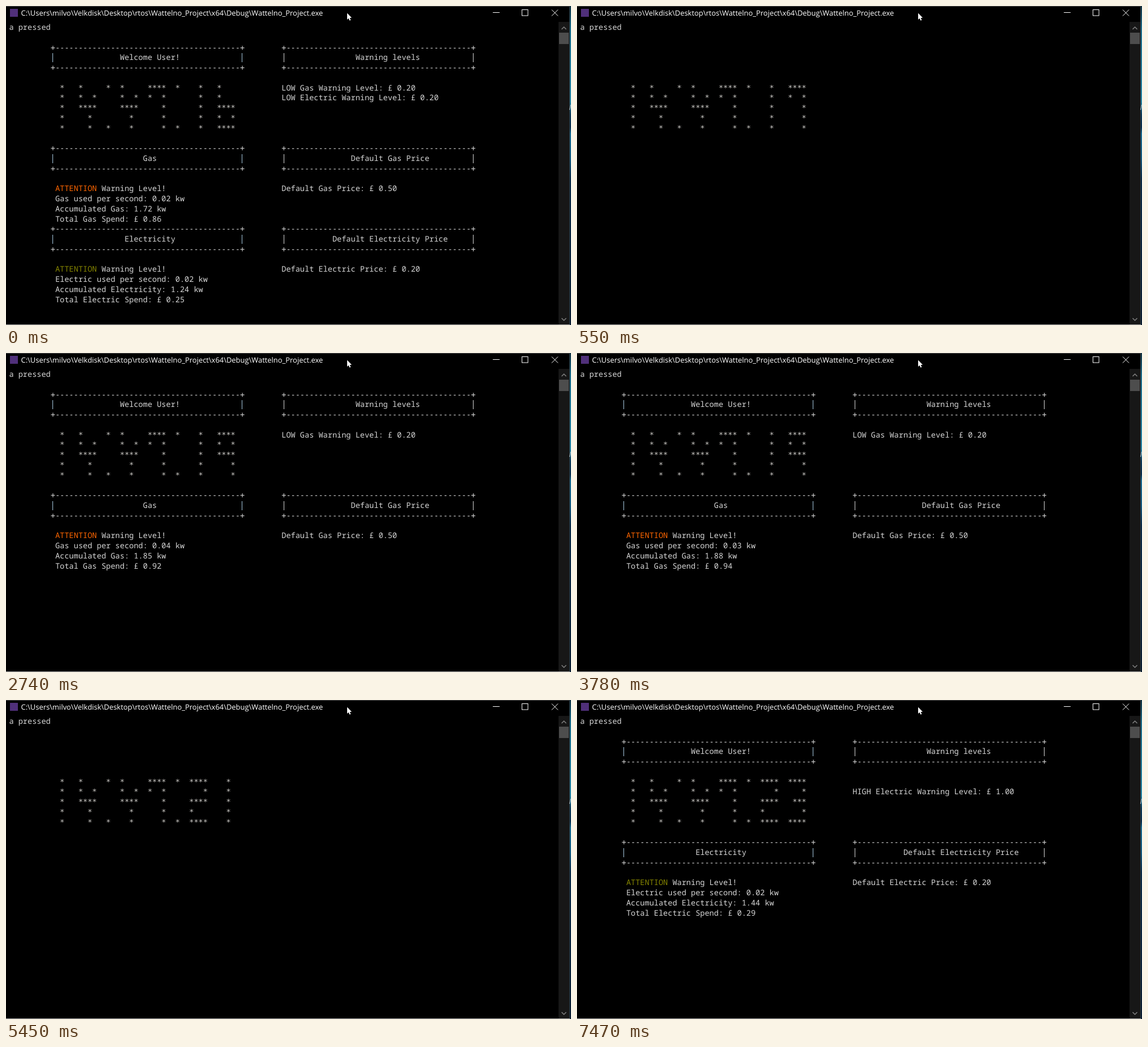
Recreate the animation shown at these times as an HTML page with a canvas. Size 997 by 562 pixels, loop 8000 ms.

```html
<!DOCTYPE html>
<html lang="en">
<head>
<meta charset="utf-8">
<title>Energy meter console</title>
<style>
  html, body { margin: 0; width: 100%; height: 100%; overflow: hidden; background: #000; }
  canvas { display: block; }
</style>
</head>
<body>
<canvas id="stage" width="997" height="562"></canvas>
<script>
const ctx = document.getElementById('stage').getContext('2d');
ctx.textRendering = 'geometricPrecision';

const LOOP = 8000;
const CELL = 8.15, ROW = 17.77, LEFT = 5.4, BASE = 42;
const MONO = '500 13.58px "Noto Sans Mono", monospace';
const LINES = '13.58px "DejaVu Sans Mono", monospace';
const UI = '12.93px "Open Sans", sans-serif';
const TEXT = '#d6d6d6', ORANGE = '#ff6600', OLIVE = '#858500', BLUISH = '#a9cbe2';
const PATH = 'C:\\Users\\milvo\\Velkdisk\\Desktop\\rtos\\Wattelno_Project\\x64\\Debug\\Wattelno_Project.exe';

// Five rows per digit, each four cells wide
const DIGITS = {
  0: '****|*  *|*  *|*  *|****',
  1: '  * |  * |  * |  * |  * ',
  2: '****|   *|****|*   |****',
  3: '****|   *| ***|   *|****',
  4: '*   |*  *|****|  * |  * ',
  6: '*   |*   |****|*  *|****',
  7: '****|*  *|   *|   *|   *',
  8: '****|*  *|****|*  *|****',
  9: '****|*  *|****|   *|   *',
  ':': '*| | | |*'
};

// Each entry changes only the fields it names
const TIMELINE = [
  { at: 0, page: 'both', sec: '16', gas: ['0.02', '1.72', '0.86'], elec: ['0.02', '1.24', '0.25'] },
  { at: 120, page: 'blank' },
  { at: 550, page: 'clock', sec: '17' },
  { at: 670, page: 'gas', gas: ['0.04', '1.76', '0.88'] },
  { at: 1600, sec: '18', gas: ['0.05', '1.81', '0.90'] },
  { at: 2620, sec: '19' },
  { at: 2740, gas: ['0.04', '1.85', '0.92'] },
  { at: 3780, gas: ['0.03', '1.88', '0.94'] },
  { at: 4530, sec: '20' },
  { at: 4930, gas: ['0.03', '1.90', '0.95'] },
  { at: 5180, page: 'blank' },
  { at: 5450, page: 'clock', sec: '21' },
  { at: 5950, page: 'elec', elec: ['0.02', '1.42', '0.28'] },
  { at: 6450, sec: '22' },
  { at: 6970, elec: ['0.02', '1.44', '0.29'] },
  { at: 7470, sec: '23' }
];

function stateAt(t) {
  return Object.assign({}, ...TIMELINE.filter(e => e.at <= t));
}

function rect(x, y, w, h, color) {
  ctx.fillStyle = color;
  ctx.fillRect(x, y, w, h);
}

function polyline(points, color, width = 1) {
  ctx.beginPath();
  points.forEach(([x, y]) => ctx.lineTo(x, y));
  ctx.strokeStyle = color;
  ctx.lineWidth = width;
  ctx.stroke();
}

// Console output on the character grid
function print(col, row, str, color = TEXT, font = MONO) {
  ctx.font = font;
  ctx.fillStyle = color;
  for (let i = 0; i < str.length; i++) {
    if (str[i] !== ' ') ctx.fillText(str[i], LEFT + (col + i) * CELL, BASE + row * ROW);
  }
}

function pipe(col, row, color) {
  const x = Math.floor(LEFT + (col + 0.5) * CELL);
  rect(x, Math.round(BASE + row * ROW) - 12, 1, 16, color);
}

function box(col, row, titleCol, title, pipeColor = TEXT) {
  const edge = '+' + '-'.repeat(40) + '+';
  print(col, row, edge, TEXT, LINES);
  print(col, row + 2, edge, TEXT, LINES);
  pipe(col, row + 1, pipeColor);
  pipe(col + 41, row + 1, pipeColor);
  print(titleCol, row + 1, title);
}

function clock(time) {
  let col = 9;
  for (const ch of time) {
    DIGITS[ch].split('|').forEach((line, r) => print(col, 6 + r, line, '#c8c6c2', LINES));
    col += ch === ':' ? 3 : 6;
  }
}

function section(row, titleCol, title, priceCol, price, unitPrice, color, lines) {
  box(9, row, titleCol, title, BLUISH);
  box(59, row, priceCol, price);
  print(10, row + 4, 'ATTENTION', color);
  print(20, row + 4, 'Warning Level!');
  lines.forEach((line, i) => print(10, row + 5 + i, line));
  print(59, row + 4, unitPrice);
}

function gasSection(row, [used, total, spend]) {
  section(row, 29, 'Gas', 74, 'Default Gas Price', 'Default Gas Price: £ 0.50', ORANGE, [
    `Gas used per second: ${used} kw`,
    `Accumulated Gas: ${total} kw`,
    `Total Gas Spend: £ ${spend}`
  ]);
}

function elecSection(row, [used, total, spend]) {
  section(row, 25, 'Electricity', 70, 'Default Electricity Price', 'Default Electric Price: £ 0.20', OLIVE, [
    `Electric used per second: ${used} kw`,
    `Accumulated Electricity: ${total} kw`,
    `Total Electric Spend: £ ${spend}`
  ]);
}

function drawWindow() {
  rect(0, 0, 997, 562, '#000');
  rect(0, 0, 995, 1, '#4a4a4a');

  rect(7, 5, 14, 14, '#50307a');
  ctx.font = UI;
  ctx.fillStyle = '#fff';
  ctx.fillText(PATH, 26.5, 17);

  polyline([[859, 11.5], [871, 11.5]], '#fff');
  ctx.strokeRect(910.5, 6.5, 10.5, 10.5);
  polyline([[963, 6.5], [974, 17.5]], '#fff');
  polyline([[974, 6.5], [963, 17.5]], '#fff');

  rect(975, 28, 19, 533, '#171717');
  rect(976, 47, 17, 20, '#4d4d4d');
  polyline([[980.5, 41], [984.5, 37], [988.5, 41]], '#808080', 1.5);
  polyline([[980.5, 550], [984.5, 554], [988.5, 550]], '#808080', 1.5);

  // Sliver of desktop beside the window
  const sky = ctx.createLinearGradient(0, 0, 0, 562);
  [[0, '#123242'], [0.07, '#1d6f8c'], [0.3, '#2a88a6'], [0.34, '#0e3a58'], [0.38, '#0a2c4a'],
   [0.4, '#1b6d92'], [0.48, '#175b80'], [0.54, '#0b2a46'], [1, '#0a1c30']]
    .forEach(([p, c]) => sky.addColorStop(p, c));
  rect(994, 0, 3, 562, sky);
  rect(994, 0, 1, 562, '#2b3a42');
  polyline([[994.5, 183], [996.5, 174]], '#c5d5da');
  rect(0, 561, 995, 1, '#a8a8a8');
}

function drawCursor() {
  ctx.beginPath();
  [[602, 12.5], [602, 24], [604.6, 21.7], [606.4, 25.7], [608.3, 24.8], [606.6, 21], [610, 20.8]]
    .forEach(([x, y]) => ctx.lineTo(x, y));
  ctx.closePath();
  ctx.strokeStyle = '#000';
  ctx.lineWidth = 1;
  ctx.stroke();
  ctx.fillStyle = '#fff';
  ctx.fill();
}

function drawConsole({ page, sec, gas, elec }) {
  print(0, 0, 'a pressed');
  if (page === 'blank') return;
  clock('14:47:' + sec);
  if (page === 'clock') return;

  box(9, 2, 24, 'Welcome User!', BLUISH);
  box(59, 2, 75, 'Warning levels');
  if (page !== 'elec') {
    print(59, 6, 'LOW Gas Warning Level: £ 0.20');
    gasSection(12, gas);
  }
  if (page === 'both') {
    print(59, 7, 'LOW Electric Warning Level: £ 0.20');
    elecSection(20, elec);
  }
  if (page === 'elec') {
    print(59, 7, 'HIGH Electric Warning Level: £ 1.00');
    elecSection(12, elec);
  }
}

const start = performance.now();

function frame() {
  const t = (performance.now() - start) % LOOP;
  drawWindow();
  drawConsole(stateAt(t));
  drawCursor();
  requestAnimationFrame(frame);
}
frame();
</script>
</body>
</html>
```
